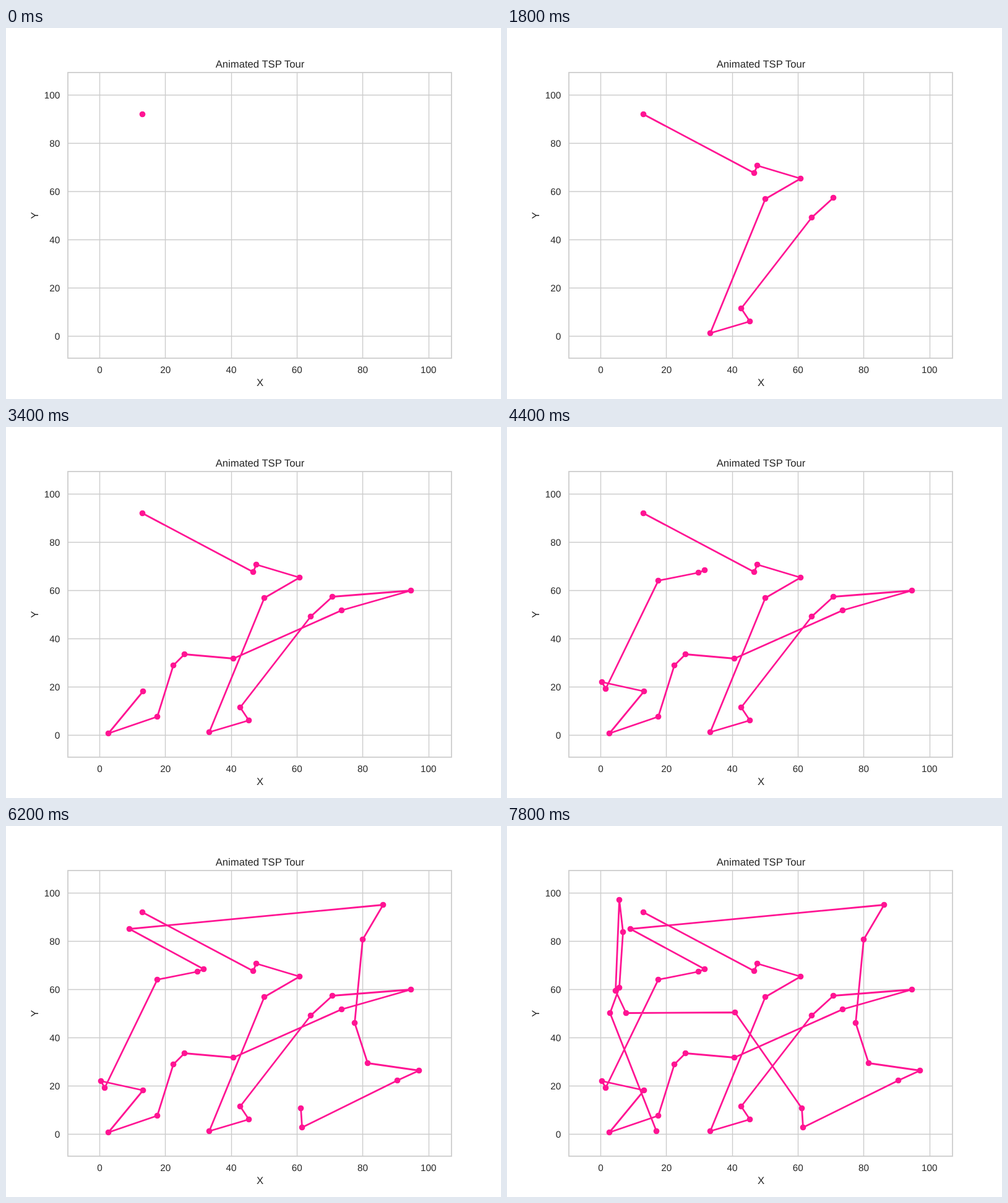
These frames come from a looping animation (800 by 600 pixels, 8000 ms). An HTML page:

```html
<!DOCTYPE html>
<html lang="en">
<head>
<meta charset="utf-8">
<title>Animated TSP Tour</title>
<style>
  html, body { margin: 0; width: 100%; height: 100%; overflow: hidden; background: #fff; }
  svg { display: block; width: 800px; height: 600px; }
  text {
    font: 15.28px "Liberation Sans", Arial, sans-serif;
    fill: #262626;
    text-anchor: middle;
    text-rendering: geometricPrecision;
  }
  .label { font-size: 16.67px; }
  .right { text-anchor: end; }
  .grid { stroke: #ccc; stroke-width: 1.39; }
  .frame { fill: none; stroke: #ccc; stroke-width: 1.74; }
  #path { fill: none; stroke: #ff1493; stroke-width: 2.78; stroke-linejoin: round; stroke-linecap: round; }
  circle { fill: #ff1493; }
</style>
</head>
<body>
<svg viewBox="0 0 800 600">
  <g id="axes"></g>
  <g id="tour" transform="translate(.5 .5)"><polyline id="path"/></g>
  <rect class="frame" x="100" y="72" width="620" height="462"/>
  <text class="label" x="410.5" y="64">Animated TSP Tour</text>
  <text class="label" x="410.5" y="579">X</text>
  <text class="label" transform="translate(52 303.3) rotate(-90)">Y</text>
</svg>
<script>
const STEP = 200;

// Visiting order of the cities; everything else is derived from it.
const tour = `220,139 399,234 404,222 474,243 417,276 328,493 392,474 378,453 492,306 527,274
  654,264 542,296 367,374 288,367 270,385 244,468 165,495 221,427 153,412 159,423
  244,248 309,235 319,231 199,166 609,127 576,183 563,318 584,383 667,395 632,411
  478,487 476,456 368,301 192,302 175,266 181,119 187,171 181,261 166,302 241,493`.split(/\s+/);

const byId = id => document.getElementById(id);

function add(parent, tag, attributes, content = "") {
  const node = document.createElementNS("http://www.w3.org/2000/svg", tag);
  for (const [key, value] of Object.entries(attributes)) node.setAttribute(key, value);
  node.textContent = content;
  parent.append(node);
  return node;
}

for (let value = 0; value <= 100; value += 20) {
  const tickX = 151.2 + 5.313 * value;
  const x = Math.round(tickX) + 0.5;
  const y = 498.5 - 3.9 * value;
  add(byId("axes"), "line", { class: "grid", x1: x, x2: x, y1: 72, y2: 534 });
  add(byId("axes"), "line", { class: "grid", x1: 100, x2: 720, y1: y, y2: y });
  add(byId("axes"), "text", { x: tickX + 0.3, y: 558 }, value);
  add(byId("axes"), "text", { class: "right", x: 87.2, y: y + 5.5 }, value);
}

const dots = tour.map(city => {
  const [cx, cy] = city.split(",");
  return add(byId("tour"), "circle", { cx, cy, r: 4.86 });
});

function draw() {
  const count = Math.floor(performance.now() / STEP) % tour.length + 1;
  byId("path").setAttribute("points", tour.slice(0, count).join(" "));
  dots.forEach((dot, i) => dot.setAttribute("visibility", i < count ? "visible" : "hidden"));
  requestAnimationFrame(draw);
}
draw();
</script>
</body>
</html>
```
